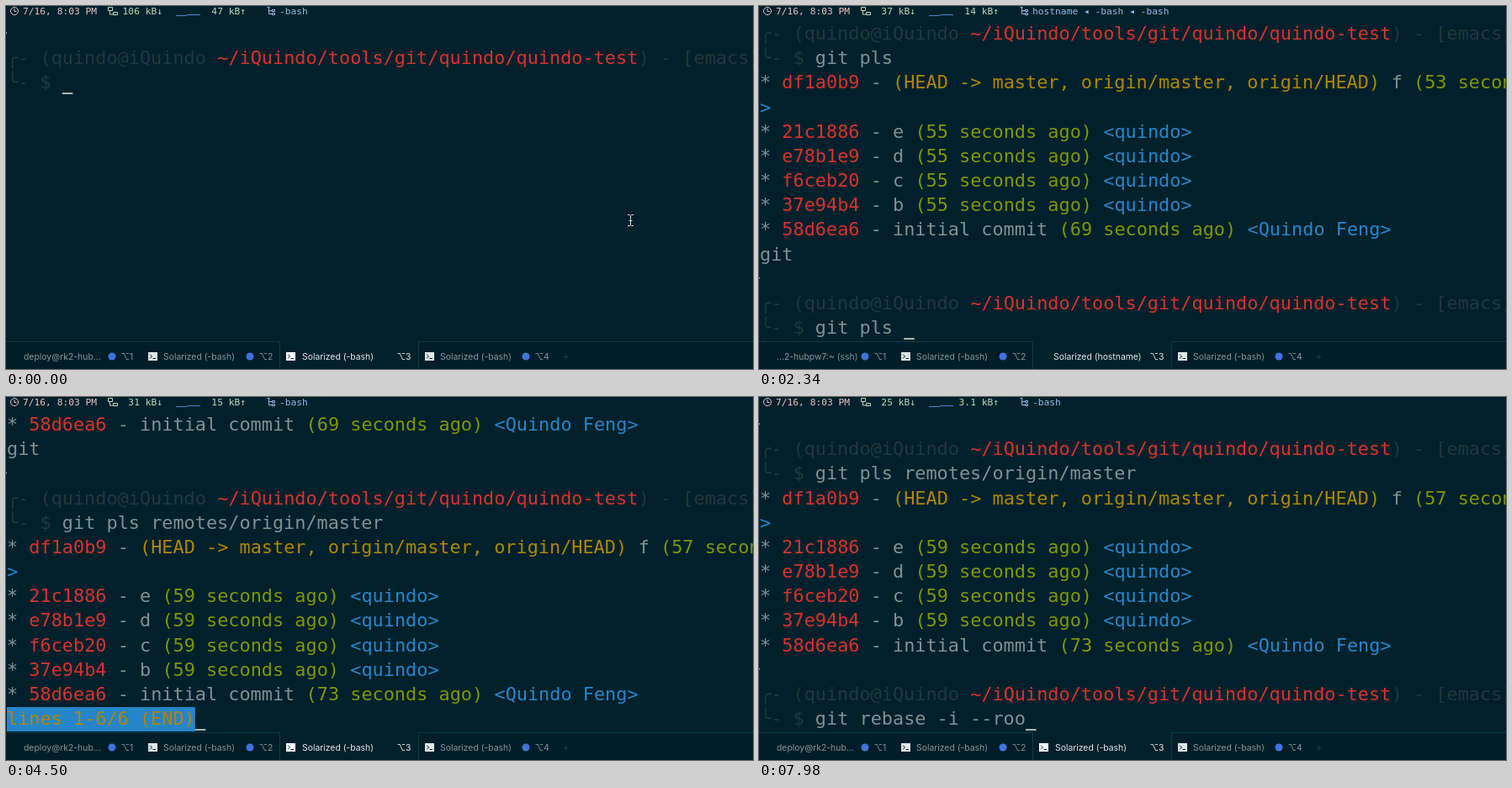
Recreate the animation shown at these times as an HTML page with a canvas. Size 888x432 px, loop 8 s.

```html
<!DOCTYPE html>
<html lang="en">
<head>
<meta charset="utf-8">
<title>Terminal session</title>
<style>
  html, body { margin: 0; width: 100%; height: 100%; overflow: hidden; background: #00212b; }
  canvas { display: block; }
</style>
</head>
<body>
<canvas id="stage" width="888" height="432"></canvas>
<script>
const ctx = document.getElementById('stage').getContext('2d');
const LOOP = 8000, ROWS = 13, CELL = 13.17, LEFT = 1, LINE = 29.17, FIRST_MID = 33;
const MONO = '"DejaVu Sans Mono", monospace';
const SANS = 'Inter, "DejaVu Sans", sans-serif';
const C = {
  bg: '#00212b', red: '#d6322f', yellow: '#ad8604', green: '#7f9606', blue: '#2685c8',
  grey: '#7f9094', dim: '#24363d', cursor: '#a9b6b6', pink: '#e8c3c1', mint: '#b4dabc',
  sky: '#94b9e6', tab: '#82959a', active: '#dfe7e7', dot: '#4273dc', edge: '#0d3c48'
};

// Moments in ms
const ENTER1 = 1080, QUIT1 = 1680, PROMPT2 = 2040, ENTER2 = 4300, QUIT2 = 5120;
const STATUS = [
  [0, '106', '47', '-bash'], [1000, '34', '4.1', '-bash'],
  [2100, '37', '14', 'hostname ◂ -bash ◂ -bash'], [3100, '23', '3.1', '-bash'],
  [4100, '31', '15', '-bash'], [5100, '20', '2.0', 'less ◂ sh ◂ git ◂ git ◂ -bash'],
  [6100, '25', '3.1', '-bash']
];
const REF_KEYS = [[2700, 'r'], [2850, 're'], [3000, 'rem'], [3300, 'remotes/origin/'],
  [3900, 'remotes/origin/m'], [4020, 'remotes/origin/ma'], [4140, 'remotes/origin/master']];

const latest = (steps, t) => steps.filter(step => step[0] <= t).pop();
const typed = (text, start, step, t) => text.slice(0, Math.max(0, Math.floor((t - start) / step) + 1));

const MARK = [];
const PROMPT = [[C.dim, '╭- (quindo@iQuindo '], [C.red, '~/iQuindo/tools/git/quindo/quindo-test'], [C.dim, ') - [emacs]']];
const PAGER = [[C.yellow, 'lines 1-6/6 (END)', C.blue]];
const command = text => [[C.dim, '╰- $ '], [C.grey, text]];

function commit(hash, message, age, author) {
  return [[C.grey, '* '], [C.red, hash], [C.grey, ` - ${message} `],
    [C.green, `(${age} seconds ago) `], [C.blue, `<${author}>`]];
}

function history(age) {
  const small = [['21c1886', 'e'], ['e78b1e9', 'd'], ['f6ceb20', 'c'], ['37e94b4', 'b']];
  return [
    [[C.grey, '* '], [C.red, 'df1a0b9'], [C.grey, ' - '],
      [C.yellow, '(HEAD -> master, origin/master, origin/HEAD)'], [C.grey, ' f '], [C.green, `(${age} seconds`]],
    [[C.blue, '>']],
    ...small.map(([hash, message]) => commit(hash, message, age + 2, 'quindo')),
    commit('58d6ea6', 'initial commit', age + 16, 'Quindo Feng')
  ];
}

function buffer(t) {
  const lines = [MARK, PROMPT, command(typed('git pls', 180, 110, t))];
  if (t < ENTER1) return lines;
  lines.push(...history(53));
  if (t < QUIT1) return [...lines, PAGER];
  lines.push([[C.grey, typed('git', 1740, 80, t)]]);
  if (t < PROMPT2) return lines;
  const ref = latest(REF_KEYS, t);
  lines.push(MARK, PROMPT, command('git' + typed(' pls ', PROMPT2, 60, t) + (ref ? ref[1] : '')));
  if (t < ENTER2) return lines;
  lines.push(...history(57));
  if (t < QUIT2) return [...lines, PAGER];
  return [...lines, MARK, PROMPT, command(typed('git rebase -i --roo', 5800, 118, t))];
}

function rect(x, y, w, h, color) {
  ctx.fillStyle = color;
  ctx.fillRect(x, y, w, h);
}

function text(value, x, y, color, font, align = 'left') {
  ctx.font = font;
  ctx.textAlign = align;
  ctx.fillStyle = color;
  ctx.fillText(value, x, y);
}

function stroke(path, color, width = 1) {
  ctx.strokeStyle = color;
  ctx.lineWidth = width;
  ctx.stroke(new Path2D(path));
}

function dot(x, y, r, color) {
  ctx.fillStyle = color;
  ctx.beginPath();
  ctx.arc(x, y, r, 0, 7);
  ctx.fill();
}

function drawLine(segments, row) {
  const mid = FIRST_MID + row * LINE;
  let col = 0;
  if (segments === MARK) rect(0, mid - 2, 1, 2, C.grey);
  for (const [color, value, back] of segments) {
    const x = LEFT + col * CELL;
    if (back) rect(x, Math.round(mid - 14.5), value.length * CELL, 29, back);
    text(value, x, Math.round(mid + 7), color, '21.875px ' + MONO);
    col += value.length;
  }
  return [LEFT + col * CELL, mid];
}

function drawStatus([, down, up, jobs]) {
  const font = '11.25px ' + MONO;
  stroke('M14.5 6a4.5 4.5 0 1 1-9 0a4.5 4.5 0 1 1 9 0M10 3V6.5H12.5', C.pink);
  text('7/16, 8:03 PM', 20, 10, C.pink, font);
  stroke('M121.5 1.5h5v4h-5zM127.5 7.5h5v3h-5zM123.5 6v4h3.5', C.mint);
  text(down + ' kB↓', 186, 10, C.mint, font, 'right');
  stroke('M202 11.5H214L216 10.5H231', '#4b86cc');
  text(up + ' kB↑', 285, 10, C.mint, font, 'right');
  stroke('M310.5 1.5h3M312.5 2v7.5h4M312.5 5.5h4M316.5 4.5h3v2h-3zM316.5 8.5h3v2h-3z', C.sky);
  text(jobs, 325, 10, C.sky, font);
}

function terminalIcon(x, color) {
  rect(x, 412, 11, 10, color);
  stroke(`M${x + 2} 414.5l2.5 2.5l-2.5 2.5M${x + 5.5} 419.5h3.5`, C.bg);
}

function drawTabs(jobs) {
  const font = '10.4px ' + SANS, job = jobs.split(' ')[0], busy = job !== '-bash';
  const label = (value, x, color = C.tab) => text(value, x, 421, color, font);
  rect(0, 400, 888, 32, '#001e28');
  rect(326, 400, 164, 32, C.bg);
  rect(0, 399, 326, 1, C.edge);
  rect(490, 399, 398, 1, C.edge);
  rect(325, 399, 1, 33, C.edge);
  rect(490, 399, 1, 33, C.edge);

  label(busy ? '…2-hubpw7:~ (ssh)' : 'deploy@rk2-hub…', 21);
  for (const [x, key] of [[126, 1], [290, 2], [618, 4]]) {
    dot(x, 417, 4.5, C.dot);
    label('⌥' + key, x + 10.5);
  }
  for (const x of [169, 498]) {
    terminalIcon(x, C.active);
    label('Solarized (-bash)', x + 18);
  }
  if (!busy) terminalIcon(333, '#ffffff');
  if (job === 'less') {
    rect(333, 412, 12, 10, '#74858a');
    stroke('M340.5 416.5a2 2 0 1 1-4 0a2 2 0 1 1 4 0M340 418l2 2', C.bg);
  }
  label(`Solarized (${job})`, { hostname: 350, less: 356 }[job] || 352, C.active);
  label('⌥3', 464.5, C.active);
  text('+', 665.5, 421, C.dim, '13px ' + SANS, 'center');
}

function drawPointer() {
  const beam = 'M739 248.5h2.5l1 1l1-1h2.5M742.5 249v12M739 261.5h2.5l1-1l1 1h2.5M740.5 255.5h4';
  stroke(beam, '#00141a', 3);
  stroke(beam, '#e8eeee');
}

function draw(t) {
  rect(0, 0, 888, 432, C.bg);
  let end;
  buffer(t).slice(-ROWS).forEach((line, row) => { end = drawLine(line, row); });
  rect(end[0], Math.round(end[1] + 12), 12.5, 2, C.cursor);
  const status = latest(STATUS, t);
  drawStatus(status);
  drawTabs(status[3]);
  if (t < 180) drawPointer();
}

const start = performance.now();
function frame() {
  draw((performance.now() - start) % LOOP);
  requestAnimationFrame(frame);
}
frame();
</script>
</body>
</html>
```
